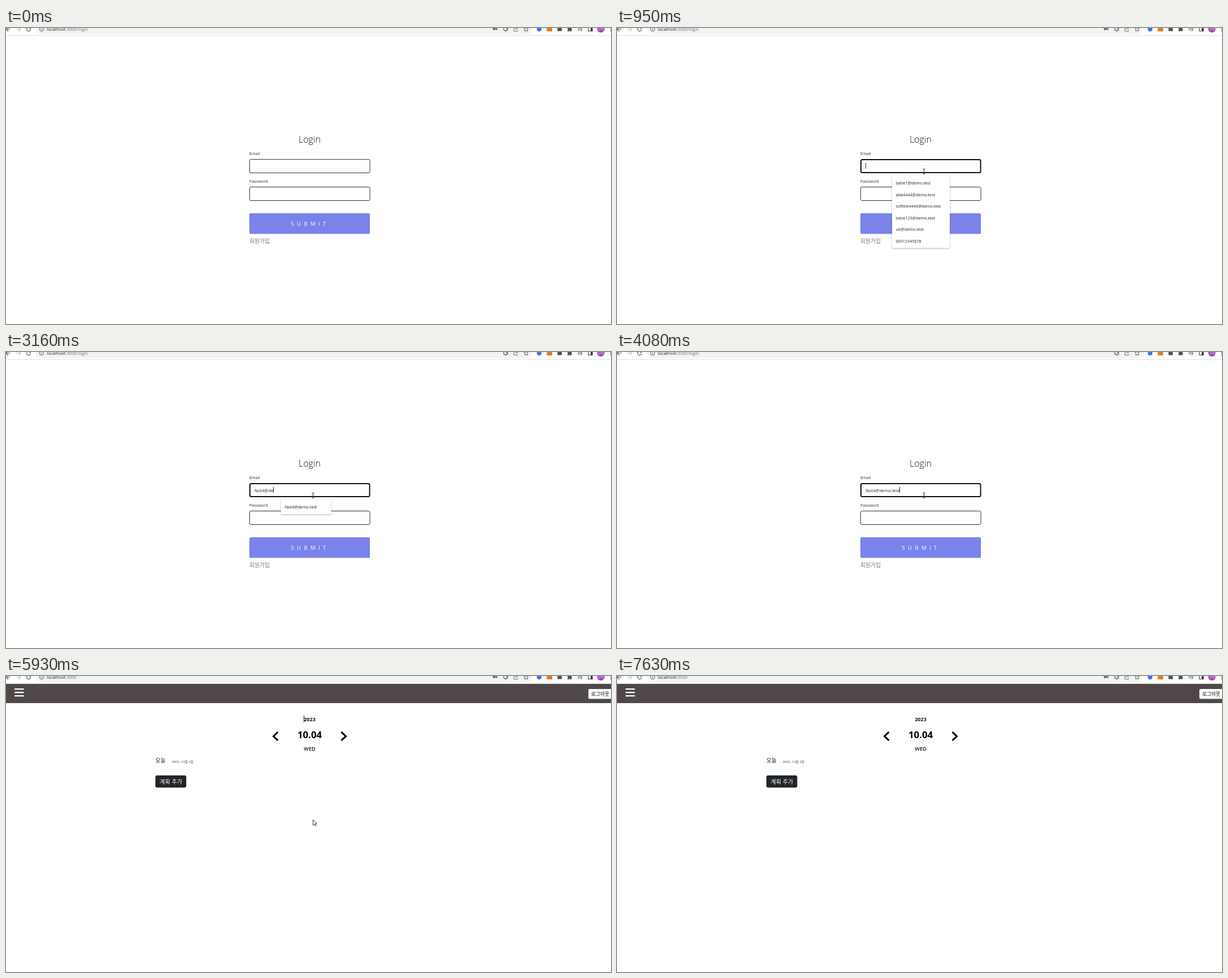
An HTML page with a canvas that plays this animation: 1069x524 px, repeating every 7.71 s.

```html
<!DOCTYPE html>
<html lang="ko">
<head>
<meta charset="utf-8">
<title>Login</title>
<style>
html, body { margin: 0; width: 100%; height: 100%; overflow: hidden; background: #fff; }
canvas { display: block; }
</style>
</head>
<body>
<canvas id="stage" width="1069" height="524"></canvas>
<script>
const ctx = document.getElementById('stage').getContext('2d');
const LOOP = 7710;
const FAMILY = '"Open Sans", "Noto Sans CJK KR", "Noto Sans CJK", sans-serif';

const EMAIL = 'fast4@demo.test';
const EMAIL_KEYS = [1160, 1240, 1390, 1470, 2020, 2230, 2480, 2930, 3240, 3320, 3470, 3550, 3620, 3700, 3930];
const PASSWORD_KEYS = [4630, 4700, 4780, 4780, 5010, 5160, 5240, 5470];
const SAVED = ['table1@demo.test', 'abb4444@demo.test', 'softtile4444@demo.test', 'table123@demo.test', 'ub@demo.test', '00012345678'];
const MATCHES = [EMAIL, 'fast@demo.test', 'fast5@demo.test', 'fast12@demo.test'];
const HOME_TIME = 5930;

const between = (t, from, to) => t >= from && t < to;
const countPassed = (times, t) => times.filter(time => t >= time).length;
const mix = (a, b, p) => a + (b - a) * p;

function text(str, x, y, size, color, weight = 400, align = 'left') {
  ctx.font = `${weight} ${size}px ${FAMILY}`;
  ctx.fillStyle = color;
  ctx.textAlign = align;
  ctx.fillText(str, x, y);
  return ctx.measureText(str).width;
}

function rect(x, y, w, h, color) {
  ctx.fillStyle = color;
  ctx.fillRect(x, y, w, h);
}

function roundRect(x, y, w, h, r, fill, stroke, width = 1) {
  ctx.beginPath();
  ctx.roundRect(x, y, w, h, r);
  if (fill) { ctx.fillStyle = fill; ctx.fill(); }
  if (stroke) { ctx.strokeStyle = stroke; ctx.lineWidth = width; ctx.stroke(); }
}

function circle(x, y, r, color) {
  ctx.beginPath();
  ctx.arc(x, y, r, 0, Math.PI * 2);
  ctx.fillStyle = color;
  ctx.fill();
}

function icon(d, x, y, color = '#4d5155', width = 1.1, fill = null) {
  const path = new Path2D(d);
  ctx.save();
  ctx.translate(x, y);
  if (fill) { ctx.fillStyle = fill; ctx.fill(path); }
  ctx.strokeStyle = color;
  ctx.lineWidth = width;
  ctx.stroke(path);
  ctx.restore();
}

function toolbar(path, showKey) {
  roundRect(53, -12, 877, 23, 11, '#f1f3f4');
  rect(0, 13, 1069, 1, '#dfe1e4');

  icon('M8 0H0M4 -4L0 0L4 4', 0, 2);
  icon('M-4 0H4M0 -4L4 0L0 4', 22, 2, '#bdc0c4');
  icon('M3.5 1A3.6 3.6 0 1 1 2.4 -2.6M3.5 -4V-1H0.5', 40, 2);
  icon('M-3.7 0A3.7 3.7 0 1 0 3.7 0A3.7 3.7 0 1 0 -3.7 0M0 -0.5V2.2M0 -2.2V-1.2', 63, 2, '#4d5155', 0.9);
  const w = text('localhost', 72, 5, 7.8, '#202124');
  text(':3000' + path, 72 + w, 5, 7.8, '#70757a');

  if (showKey) icon('M-3.6 0A1.6 1.6 0 1 0 -0.4 0A1.6 1.6 0 1 0 -3.6 0M-0.4 0H4M2.5 0V2.2', 864.5, 1.5, '#4d5155', 1.6);
  icon('M0 -3H-3.5V2.5H3.5V0M-1.5 4H1.5M2 -4V0M0.2 -1.8L2 0L3.8 -1.8', 883, 1.5);
  icon('M-1 -3H-3.5V4H3V2M-1.5 1.5Q-1 -1.5 3.5 -1.5M1.5 -3.5L3.5 -1.5L1.5 0.5', 901, 1.5, '#5f6368', 0.9);
  icon('M0 -4L1.2 -1.2L4 -1L1.9 1L2.5 3.8L0 2.3L-2.5 3.8L-1.9 1L-4 -1L-1.2 -1.2Z', 919, 2, '#4d5155', 0.9);
  circle(942, 2, 4.2, '#4273e8');
  rect(955.5, -3, 9.5, 9, '#e07b28');
  rect(974.5, -2, 7.5, 7.5, '#4d5155');
  icon('M-3.5 -2H-1A1 1 0 1 1 1 -2H2.8V0A1 1 0 1 1 2.8 2V4H0.8A1 1 0 1 0 -1.2 4H-3.5V2A1 1 0 1 0 -3.5 0Z', 996, 1.5, '#4d5155', 0.8, '#4d5155');
  icon('M-4 -3H3M-4 -0.5H3M-4 2H-0.5M2.5 -0.5V3M2.5 -0.5H4.5M0.8 3H2.5', 1014, 2, '#4d5155', 1.2);
  icon('M-3.5 -4H3.5V3.5H-3.5Z', 1032.5, 2, '#3c4043');
  rect(1033, -2, 3.5, 7.5, '#3c4043');
  circle(1051, 1.5, 6.5, '#9c3fb5');
  text('나무', 1051, 4, 6, '#fff', 400, 'center');
  [-2, 1.5, 5].forEach(y => circle(1068.5, y, 0.9, '#4d5155'));
}

function caret(x, y) {
  rect(Math.round(x), y, 1, 10, '#222');
}

function field(y, focused) {
  if (focused) roundRect(431, y + 1, 211.5, 23, 2.5, '#fff', '#101010', 2);
  else roundRect(430.5, y + 0.5, 212.5, 24, 2.5, '#fff', '#333');
}

function dropdown(rows, width, alpha) {
  const height = rows.length * 20.5 + 5.5;
  ctx.save();
  ctx.globalAlpha = alpha;
  ctx.shadowColor = 'rgba(0,0,0,0.3)';
  ctx.shadowBlur = 3;
  ctx.shadowOffsetY = 1;
  roundRect(486, 261, width, height, 2, '#fff');
  ctx.shadowColor = 'transparent';
  ctx.beginPath();
  ctx.moveTo(492, 262);
  ctx.lineTo(496.5, 257.5);
  ctx.lineTo(501, 262);
  ctx.fill();
  rows.forEach((row, i) => text(row, 492.5, 277 + i * 20.5, 7.2, '#222'));
  ctx.restore();
}

function suggestions(t) {
  if (between(t, 900, 1240)) dropdown(SAVED, 102, t < 950 ? 0.5 : 1);
  else if (between(t, 1320, 2020)) dropdown(MATCHES, 88.5, t < 1390 ? 0.6 : 1);
  else if (between(t, 2020, 4010)) {
    // The popup briefly closes and fades back while the list refreshes.
    if (between(t, 2560, 2640) || between(t, 3010, 3085)) return;
    const fading = between(t, 2640, 2710) || between(t, 3085, 3150);
    dropdown([EMAIL], 88.5, fading ? 0.6 : 1);
  }
}

function loginPage(t) {
  toolbar('/login', t < 1240 || t >= 4700);
  const emailFocus = between(t, 900, 4090);
  const passwordFocus = t >= 4090;

  text('Login', 536.5, 203, 16, '#111', 300, 'center');
  text('Email', 430, 225, 7.3, '#333');
  text('Password', 430, 274, 7.3, '#333');
  field(232, emailFocus);
  field(281, passwordFocus);

  const typed = EMAIL.slice(0, countPassed(EMAIL_KEYS, t));
  const typedWidth = text(typed, 439, 247.5, 7.65, '#222');
  if (emailFocus) caret(439 + typedWidth, 239);

  const dots = countPassed(PASSWORD_KEYS, t);
  for (let i = 0; i < dots; i++) circle(441 + i * 3.35, 293.8, 1.25, '#111');
  if (passwordFocus) caret(438.6 + dots * 3.35, 288);

  roundRect(430, 328, 213, 36.5, 2.5, '#7b83eb');
  ctx.letterSpacing = '5.4px';
  text('SUBMIT', 503.5, 350, 9.5, '#fff');
  ctx.letterSpacing = '0px';
  text('회원가입', 430, 380.5, 9.8, '#777');
  suggestions(t);
}

function homePage(t) {
  toolbar('', true);
  rect(0, 14, 1069, 34, '#504848');
  [22, 28, 34].forEach(y => rect(15, y, 16.5, 2.3, '#fff'));
  roundRect(1029, 23, 46, 17.5, 2.5, '#f8f9fa');
  text('로그아웃', 1034, 34.8, 8.7, '#111');

  text('2023', 536.5, 79.5, 9, '#111', 700, 'center');
  text('10.04', 536.5, 109.5, 16.8, '#000', 700, 'center');
  text('WED', 536.5, 132, 9.1, '#111', 600, 'center');
  icon('M9 -7.5L1 0L9 7.5', 471.5, 106.7, '#000', 3);
  icon('M-9 -7.5L-1 0L-9 7.5', 601.5, 106.7, '#000', 3);

  text('오늘', 264, 153.3, 9.7, '#111', 500);
  text('WED, 10월 4일', 293, 154, 5.9, '#555');
  roundRect(264, 176, 54.5, 21.5, 3, '#212529');
  text('계획 추가', 271.5, 190.5, 10.1, '#fff');

  if (t < 6470 || between(t, 6930, 7080)) rect(526, 70, 1, 12, '#222');
}

function pointerPosition(t) {
  if (t < 130 || t >= 6930) return null;
  if (t < 6470) {
    const p = Math.min(1, Math.floor((t - 130) / 68.8) / 9);
    const eased = p * p * (3 - 2 * p);
    return [mix(948, 542, eased), mix(482, 254, eased)];
  }
  const p = (Math.floor((t - 6470) / 76.7) + 1) / 6;
  const eased = p * p;
  return [mix(541, 1020, eased), mix(253, 451, eased)];
}

function pointer(t) {
  const position = pointerPosition(t);
  if (!position) return;
  const [x, y] = position;
  const overField = t < HOME_TIME && between(x, 430, 643) &&
    (between(y, 232, 257) || between(y, 281, 306));
  if (overField) icon('M-2 -4.5H-0.7L0 -4L0.7 -4.5H2M0 -4V4M-2 4.5H-0.7L0 4L0.7 4.5H2', x + 0.5, y, '#222', 1);
  else icon('M0 0V9.6L2.2 7.5L3.8 11L5.4 10.3L3.9 7H6.8Z', x + 0.5, y + 0.5, '#222', 0.9, '#fff');
}

function draw(t) {
  rect(0, 0, 1069, 524, '#fff');
  if (t < HOME_TIME) loginPage(t);
  else homePage(t);
  pointer(t);
}

const start = performance.now();
function frame() {
  draw((performance.now() - start) % LOOP);
  requestAnimationFrame(frame);
}
frame();
</script>
</body>
</html>
```
